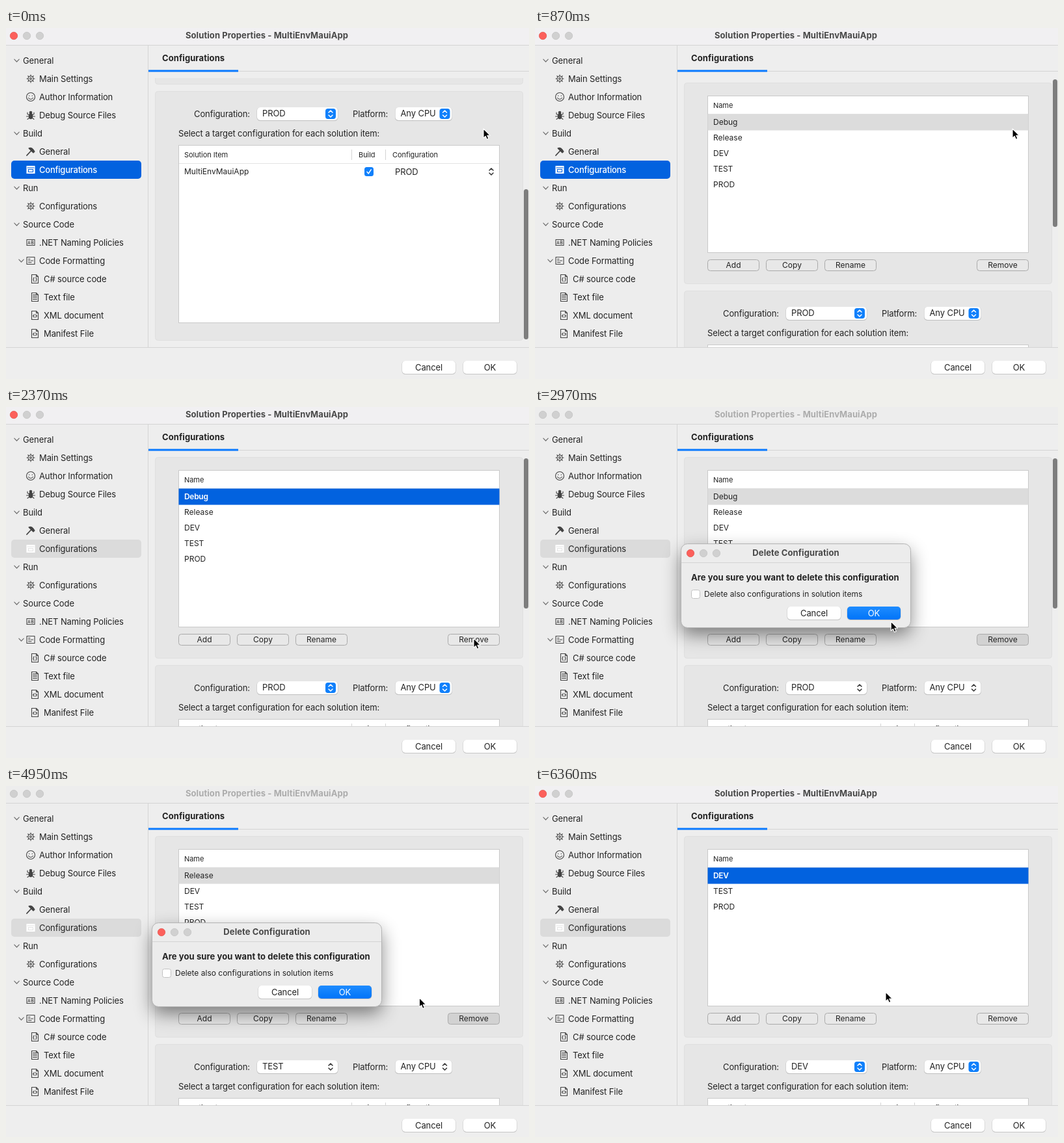
Write an HTML page that moves like this. It is 804 px wide and 540 px high and loops after 6.48 s.

```html
<!DOCTYPE html>
<html lang="en">
<head>
<meta charset="utf-8">
<title>Solution Properties</title>
<style>
html, body { margin: 0; width: 100%; height: 100%; overflow: hidden; background: #eee; }
svg { display: block; width: 100%; height: 100%; }
text { font: 13px Inter, Roboto, sans-serif; letter-spacing: -.1px; fill: #222; }
.s12 { font-size: 12px; letter-spacing: 0; }
.s11 { font-size: 11px; letter-spacing: -.06px; }
.bold { font-weight: 700; letter-spacing: .08px; }
.mid { text-anchor: middle; }
.title { fill: #484848; }
.ico { fill: none; stroke: #444; stroke-width: 1.1; stroke-linecap: round; stroke-linejoin: round; }
.fold { fill: none; stroke: #707070; stroke-width: 1.2; stroke-linecap: round; stroke-linejoin: round; }
.chev { fill: none; stroke: #fff; stroke-width: 1.5; stroke-linecap: round; stroke-linejoin: round; }
.dark { stroke: #333; }
.knob { fill: #1080fb; }
.red { fill: #fc605b; stroke: #e0504a; }
.dim { fill: #d0d0d0; stroke: #c0c0c0; }
.push { fill: #e8e8e8; stroke: #aaa; }
.white { fill: #fff; }
.bar { fill: #f1f0f2; }
.pane { stroke: #0262df; }
.selBox { fill: #0262df; }
.selText { fill: #fff; font-weight: 500; letter-spacing: -.22px; }
.pick { fill: #dcdcdc; }
.focus .pane { stroke: #e4e4e4; }
.focus .selBox { fill: #dbdbdb; }
.focus .selText { fill: #222; font-weight: 400; letter-spacing: -.1px; }
.focus:not(.modal) .pick { fill: #0262df; }
.focus:not(.modal) .first { fill: #fff; font-weight: 600; letter-spacing: -.3px; }
.modal .main .red { fill: #d0d0d0; stroke: #c0c0c0; }
.modal .main .title { fill: #acacac; }
.modal .bar { fill: #ededed; }
.modal .knob { fill: none; }
.modal .combo .chev { stroke: #333; }
.held .remove { fill: #d2d2d2; }
</style>
</head>
<body>
<svg id="stage" viewBox="0 0 804 540" preserveAspectRatio="none"></svg>
<script>
const LOOP = 6480, STEP = 30, SCROLL_MAX = 300;
const NAMES = ['Debug', 'Release', 'DEV', 'TEST', 'PROD'];
const CHOICES = ['PROD', 'TEST', 'DEV'];
const stage = document.getElementById('stage');

// ---- drawing helpers ----
const text = (x, y, s, cls = '') => `<text x="${x}" y="${y}" class="${cls}">${s}</text>`;
const box = (x, y, w, h, attrs = '') => `<rect x="${x}" y="${y}" width="${w}" height="${h}" ${attrs}/>`;
const line = (x1, y1, x2, y2, c = '#d4d4d4') => `<path d="M${x1} ${y1}L${x2} ${y2}" stroke="${c}"/>`;
const at = (x, y, inner) => `<g transform="translate(${x} ${y})">${inner}</g>`;
const path = (d, extra = '') => `<path d="${d}" ${extra}/>`;
const arrows = (x, y, cls = '') => at(x, y, path('M-3-2L0-5L3-2M-3 2L0 5L3 2', `class="chev ${cls}"`));

const lights = (x, y) => [0, 20, 40].map((d, i) =>
  `<circle cx="${x + d}" cy="${y}" r="5.7" class="${i ? 'dim' : 'red'}" stroke-width=".7"/>`).join('');

const raised = (x, y, w, attrs = 'fill="#fff"') =>
  box(x - .5, y, w + 1, 21, 'rx="5.5" fill="#000" opacity=".17"') + box(x, y, w, 20, `rx="5" ${attrs}`);

const dialogButton = (x, y, label) => raised(x, y, 82) + text(x + 41, y + 14.5, label, 'mid');

const pushButton = (x, label, cls = '') =>
  box(x + .5, 349.5, 79, 17, `rx="4" class="push ${cls}"`) + text(x + 40, 362.3, label, 's12 mid');

const combo = (x, w, label, id) => `<g class="combo">${raised(x, 422, w)}
  ${box(x + w - 19, 424, 16, 16, 'rx="4" class="knob"')}${arrows(x + w - 11, 432)}
  <text id="${id}" x="${x + 8}" y="436.4">${label}</text></g>`;

const panel = (y, h) => box(229.5, y + .5, 565, h, 'rx="4" fill="#e6e6e6" stroke="#dfdfdf"');
const table = (y, h) => box(265.5, y + .5, 493, h, 'fill="#fff" stroke="#c9c9c9"') +
  line(266, y + 28.5, 758, y + 28.5, '#e3e3e3');

// ---- sidebar ----
const spokes = Array.from({ length: 8 }, (_, i) => {
  const a = i * Math.PI / 4, c = Math.cos(a), s = Math.sin(a);
  return `M${(c * 4).toFixed(2)} ${(s * 4).toFixed(2)}L${(c * 6).toFixed(2)} ${(s * 6).toFixed(2)}`;
}).join('');
const sheet = 'M-5-6.5H2L5-3.5V6.5H-5ZM2-6.5V-3.5H5';
const ICONS = {
  gear: `<circle r="4"/><circle r="1.4"/>${path(spokes)}`,
  smile: `<circle r="6.5"/>${path('M-3.4 1.5Q0 5.6 3.4 1.5M-2.3-2V-1.6M2.3-2V-1.6')}`,
  bug: `<ellipse cy="1.5" rx="2.7" ry="4.2" fill="#444"/><circle cy="-4" r="1.8" fill="#444"/>` +
    path('M-2 0L-5-1.5V-4M2 0L5-1.5V-4M-2 2H-6.5M2 2H6.5M-2 4L-5 6.5M2 4L5 6.5'),
  hammer: path('M-6 6L1-1.5', 'stroke-width="1.8"') + path('M-3-5Q1-7 4-3L6 0L4 2L0-2Z', 'fill="#444"'),
  window: box(-6, -5.5, 12, 11, 'fill="#fff" stroke="#fff"') +
    path('M-5-3H5M-3.5-.5H3.5V3.5H-3.5Z', 'class="pane"'),
  letters: box(-6, -4.5, 12, 9) + path('M-4 2.5L-2.6-2.5L-1.2 2.5M-3.6 1H-1.6M1-2.5V2.5H3.8V0H1H3.4V-2.5Z', 'stroke-width=".8"'),
  format: box(-6, -5.5, 12, 11) + path('M-3.5-2.5H-1M-3.5 0H-1M.5 0H3.5M-3.5 2.7H1'),
  braces: path(sheet) + path('M-1-2Q-2.5-2-2 0Q-3 1-2 2Q-2 4-1 4M1-2Q2.5-2 2 0Q3 1 2 2Q2 4 1 4'),
  lines: path(sheet) + path('M-3-3.5H1M-3-1.3H3M-3 1H3M-3 3.5H3'),
  code: path(sheet) + path('M-1-1L-3 1L-1 3M1-1L3 1L1 3')
};
const TREE = [
  [0, 'General'], [1, 'Main Settings', 'gear'], [1, 'Author Information', 'smile'],
  [1, 'Debug Source Files', 'bug'], [0, 'Build'], [1, 'General', 'hammer'],
  [1, 'Configurations', 'window'], [0, 'Run'], [1, 'Configurations', 'gear'],
  [0, 'Source Code'], [1, '.NET Naming Policies', 'letters'], [1, 'Code Formatting', 'format', true],
  [2, 'C# source code', 'braces'], [2, 'Text file', 'lines'],
  [2, 'XML document', 'code'], [2, 'Manifest File', 'code']
];
const treeRow = ([level, label, icon, open], i) => {
  const y = 50 + i * 28;
  const fold = !level ? 16.5 : open ? 23.5 : 0;
  return (fold ? at(fold, y, path('M-3.7-1.8L0 2L3.7-1.8', 'class="fold"')) : '') +
    (icon ? at(level === 1 ? 38 : 44.5, y, `<g class="ico">${ICONS[icon]}</g>`) : '') +
    text([26, 51, 58][level], y + 4.8, label, icon === 'window' ? 'selText' : '');
};
const sidebar = box(8, 204, 200, 28, 'rx="5" class="selBox"') + TREE.map(treeRow).join('');

// ---- scrolled page ----
const listPanel = panel(77, 309) + table(97, 241) + text(274, 116, 'Name', 's11') +
  box(265.5, 125.5, 493, 25, 'class="pick"') +
  NAMES.map((n, i) => text(274, 142.2 + i * 24, n, 's12 row' + (i ? '' : ' first'))).join('') +
  pushButton(265, 'Add') + pushButton(355, 'Copy') + pushButton(445, 'Rename') +
  pushButton(679, 'Remove', 'remove');

const itemPanel = panel(397, 383) + text(289, 436.7, 'Configuration:') + combo(386, 124, 'PROD', 'choice') +
  text(533, 436.7, 'Platform:') + combo(598.5, 87, 'Any CPU', 'cpu') +
  text(265, 467, 'Select a target configuration for each solution item:') +
  table(480, 273) + line(531.5, 487, 531.5, 503) + line(583.5, 487, 583.5, 503) +
  text(274, 499, 'Solution Item', 's11') + text(542, 499, 'Build', 's11') + text(594, 499, 'Configuration', 's11') +
  text(274, 525, 'MultiEnvMauiApp', 's12') + box(551, 514, 14, 14, 'rx="3.5" class="knob"') +
  at(558, 521, path('M-3 .3L-.8 3L3.2-3.2', 'class="chev"')) +
  text(598, 525.8, 'PROD') + arrows(746, 521, 'dark');

// ---- dialog ----
const dialog = `<g filter="url(#shade)">${box(225, 211, 352, 128, 'rx="10" fill="#ececec"')}</g>` +
  box(224.5, 210.5, 353, 129, 'rx="10" fill="#ececec" stroke="#b4b4b4"') +
  line(225, 239.5, 577, 239.5) + lights(239, 225) +
  text(401, 229.3, 'Delete Configuration', 'bold mid title') +
  text(240, 267, 'Are you sure you want to delete this configuration', 'bold') +
  box(240.5, 281.5, 13, 13, 'rx="3" fill="#fff" stroke="#c2c2c2"') +
  text(260, 292.2, 'Delete also configurations in solution items', 's12') +
  dialogButton(388, 307, 'Cancel') + raised(480, 307, 82, 'fill="url(#blue)"') +
  text(521, 321.5, 'OK', 'mid white');

stage.innerHTML = `<defs>
  <clipPath id="view">${box(219, 77, 577, 414)}</clipPath>
  <linearGradient id="blue" x2="0" y2="1"><stop stop-color="#1f8cff"/><stop offset="1" stop-color="#0074f8"/></linearGradient>
  <filter id="shade" x="-20%" y="-40%" width="140%" height="190%"><feDropShadow dx="0" dy="11" stdDeviation="14" flood-opacity=".48"/></filter>
</defs>
<g class="main">${box(0, 0, 804, 540, 'fill="#eee"')}${box(0, 0, 804, 26, 'class="bar"')}${box(0, 27, 218, 464, 'fill="#ededed"')}
  ${lights(12, 12)}${text(401, 16.4, 'Solution Properties - MultiEnvMauiApp', 'bold mid title')}
  ${line(0, 26.5, 804, 26.5)}${line(218.5, 27, 218.5, 491)}${line(219, 66.5, 804, 66.5)}${line(0, 491.5, 804, 491.5)}
  ${text(240, 51.2, 'Configurations', 'bold')}${box(219, 64.5, 138, 3, 'fill="#0a7aff"')}${sidebar}
  <g clip-path="url(#view)"><g id="page">${listPanel}${itemPanel}</g></g>
  ${box(796, 79, 7, 231, 'id="thumb" rx="3.5" fill="#7d7d7d"')}
  ${dialogButton(609, 512, 'Cancel')}${dialogButton(703, 512, 'OK')}</g>
<g id="dialog">${dialog}</g>
<circle id="ring" r="20" fill="#fff" fill-opacity=".3" stroke="#000" stroke-width="3"/>
<g id="cursor">${path('M0 0V14.3L3.2 11.3L5.3 16.3L7.9 15.2L5.8 10.3H10.3Z', 'stroke="#fff" stroke-width="1.1" stroke-linejoin="round"')}</g>`;

const [page, thumb, dlg, ring, cursor, choice] =
  ['page', 'thumb', 'dialog', 'ring', 'cursor', 'choice'].map(id => document.getElementById(id));
const rows = [...stage.querySelectorAll('.row')];

// ---- motion ----
const clamp = v => Math.max(0, Math.min(1, v));
const smooth = p => p * p * (3 - 2 * p);
const quick = p => 1 - (1 - p) ** 5;
const during = (t, spans) => spans.some(([a, b]) => t >= a && t < b);

// start, end, x, y, bend, easing
const MOVES = [
  [1110, 1620, 438, 145, 0, smooth],
  [1950, 2370, 719, 356, 0, smooth],
  [2820, 3240, 526, 318, 20, quick],
  [3960, 4380, 719, 356, 0, smooth],
  [4650, 5280, 539, 317, -12, smooth]
];
const PRESSES = [[1650, 1770], [2400, 2520], [3420, 3540], [4410, 4530], [5550, 5670]];
const DIALOGS = [[2520, 3600], [4530, 5730]];

function pointer(t) {
  let x = 734, y = 155;
  for (const [a, b, tx, ty, bend, ease] of MOVES) {
    const e = ease(clamp((t - a) / (b - a)));
    x += (tx - x) * e;
    y += (ty - y) * e + bend * 4 * e * (1 - e);
  }
  return [x, y];
}

// Glides to the top, then springs back from a small overshoot.
function scrollAt(t) {
  if (t < 750) return SCROLL_MAX - (SCROLL_MAX + 15) * smooth(clamp((t - 450) / 300));
  return -15 * (1 - clamp((t - 750) / 360)) ** 1.9;
}

function draw(t) {
  const scroll = scrollAt(t);
  page.setAttribute('transform', `translate(0 ${-Math.round(scroll)})`);
  thumb.setAttribute('y', 79 + Math.max(0, scroll) * 169 / SCROLL_MAX);
  thumb.setAttribute('height', 231 + Math.min(0, scroll) * 4 / 7);
  thumb.setAttribute('opacity', 1 - clamp((t - 2970) / 240));

  const [x, y] = pointer(t);
  cursor.setAttribute('transform', `translate(${x} ${y})`);
  ring.setAttribute('cx', x + 1);
  ring.setAttribute('cy', y + 2);
  ring.style.display = during(t, PRESSES) ? '' : 'none';

  const modal = during(t, DIALOGS);
  const fade = Math.max(...DIALOGS.map(([a, b]) => Math.min(clamp((t - a + 30) / 90), clamp((b + 30 - t) / 90))));
  const k = .94 + .06 * fade;
  dlg.style.display = fade ? '' : 'none';
  dlg.setAttribute('opacity', fade);
  dlg.setAttribute('transform', `translate(401 275) scale(${k}) translate(-401 -275)`);

  stage.classList.toggle('modal', modal);
  stage.classList.toggle('focus', t >= 1740);
  stage.classList.toggle('held', modal || during(t, [PRESSES[1], PRESSES[3]]));

  const gone = DIALOGS.filter(d => t >= d[1]).length;
  rows.forEach((r, i) => { r.textContent = NAMES[i + gone] || ''; });
  choice.textContent = CHOICES[gone];
}

const start = performance.now();
function tick() {
  const t = (performance.now() - start) % LOOP;
  draw(Math.floor(t / STEP) * STEP);
  requestAnimationFrame(tick);
}
draw(0);
requestAnimationFrame(tick);
</script>
</body>
</html>
```
